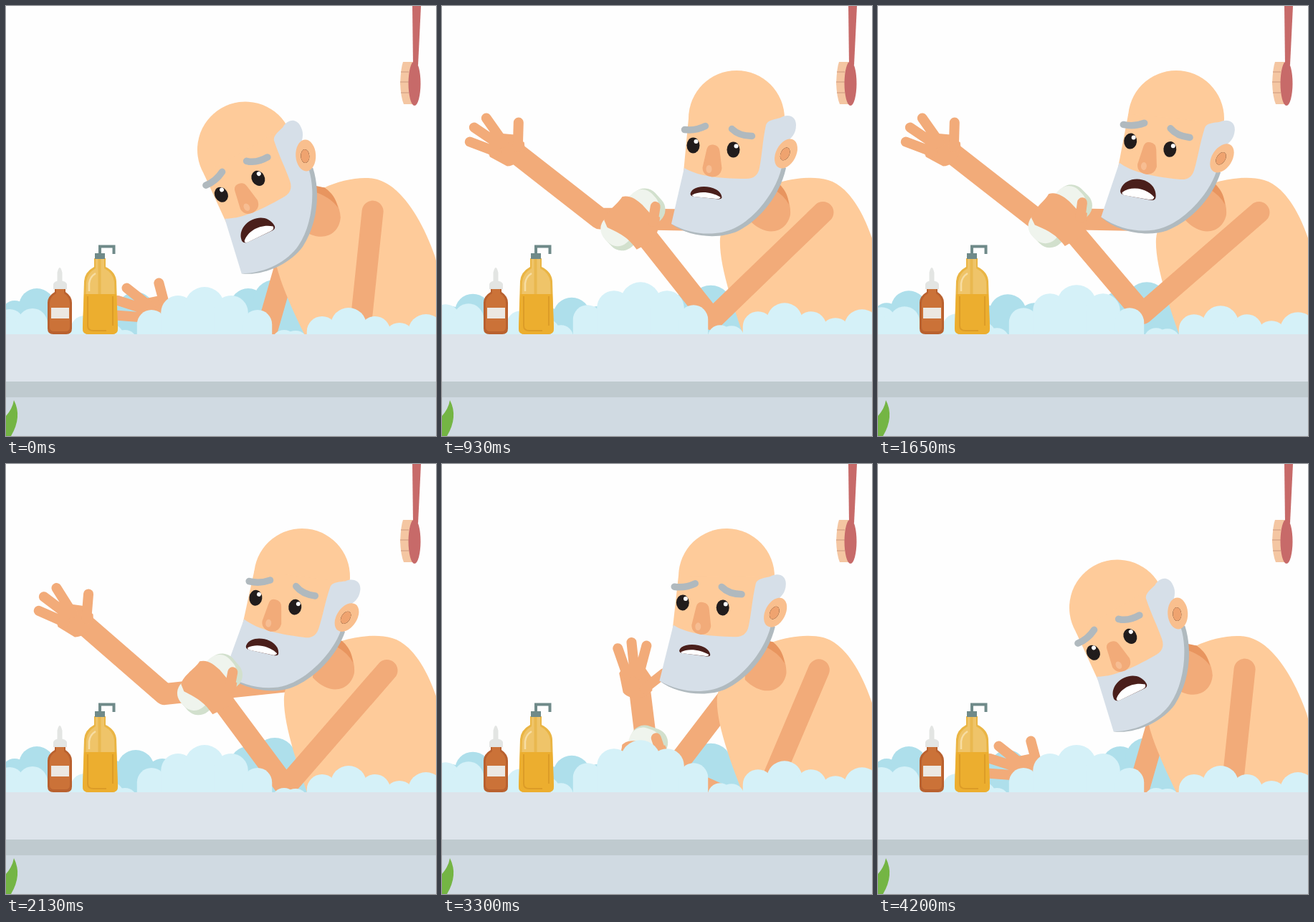
Animation of 600x600 px, one loop 4.23 s. Source, as an HTML page:

```html
<!DOCTYPE html>
<html lang="en">
<head>
<meta charset="utf-8">
<title>Bath time</title>
<style>
  html, body { margin: 0; width: 100%; height: 100%; overflow: hidden; background: #fefefe; }
  svg { display: block; width: 100vw; height: 100vh; }
  .skin { fill: #fecb9a; }
  .shade { fill: #f2ab79; }
  .limb { fill: none; stroke: #f2ab79; stroke-width: 30; stroke-linecap: round; stroke-linejoin: round; }
  .finger { stroke-width: 14; }
  .brow { fill: none; stroke: #b0b9be; stroke-width: 9.5; stroke-linecap: round; }
  .beard { fill: #d6dfe8; }
</style>
</head>
<body>
<svg viewBox="0 0 600 600">
  <rect width="600" height="600" fill="#fefefe"/>

  <g id="brush">
    <path d="M554 78H567V137H555Q551 128 550 108Q551 86 554 78Z" fill="#f4c6a2"/>
    <path d="M551 92H562M550 106H562M551 121H562" stroke="#d9a88b" stroke-width="1.5"/>
    <path d="M567 0H579L575 82H568Z" fill="#c76a69"/>
    <ellipse cx="570" cy="108" rx="8.5" ry="31" fill="#c76a69"/>
  </g>

  <g id="backFoam" fill="#aedfeb"></g>

  <g id="farArm">
    <polyline id="farLimb" class="limb"/>
    <g id="farHand">
      <path class="shade" d="M-28 4L-12 -18L10 -16L24 -5L25 6C20 20 10 28 0 28L-24 15Z"/>
      <path class="limb finger" d="M-15 8L-52 -6M-12 -3L-46 -26M-5 -5L-29 -39M15 2L16 -33"/>
    </g>
  </g>

  <g id="torso">
    <path class="skin" d="M468 247C490 240 519 237 539 243C573 253 598 305 610 360L625 480H428C408 425 386 362 388 325C391 290 430 255 468 247Z"/>
    <path class="shade" d="M430 238L469 247C481 260 487 276 486 291C481 316 453 325 428 298Z"/>
    <path d="M452 241L469 247C478 255 483 264 484 277Q476 261 452 250Z" fill="#e8955f"/>
  </g>

  <g id="head">
    <path d="M320 304C345 323 387 326 413 314C446 297 472 262 480 226L460 215Z" fill="#b0babf"/>
    <circle class="skin" cx="411" cy="157" r="67"/>
    <path class="skin" d="M344 157L337 232L440 250L472 200L478 157Z"/>
    <path class="beard" d="M338 226C355 236 380 241 425 241Q440 241 443 226C447 205 447 190 452 166C454 159 465 158 472 156C482 150 494 153 494 166C494 179 487 184 481 190L474 225C467 257 438 296 408 310C385 321 350 321 320 304Z"/>
    <g transform="rotate(27 480 206)">
      <ellipse cx="480" cy="206" rx="14" ry="22" fill="#f9bf8e"/>
      <ellipse cx="479" cy="207" rx="6" ry="9.5" fill="#ef a36f"/>
      <ellipse cx="479" cy="207" rx="6" ry="9.5" fill="#efa36f"/>
    </g>
    <g transform="translate(-.5 -1.5)">
      <g fill="#211c1c">
        <ellipse cx="351" cy="196" rx="9" ry="11"/>
        <ellipse cx="407" cy="202" rx="9" ry="11"/>
      </g>
      <g fill="#fff">
        <circle cx="355" cy="190.5" r="3"/>
        <circle cx="411" cy="197" r="3"/>
      </g>
      <path class="brow" d="M339 174Q354 176 368 169M405 173Q415 183 433 183"/>
      <path class="shade" d="M370 201Q372 194 379 195Q387 196 388 204L391 228Q389 240 377 240Q364 238 364 227Z"/>
      <ellipse cx="373" cy="229" rx="4" ry="5.5" fill="#f7bd92"/>
    </g>
    <g id="mouth">
      <path d="M-25 5C-22 -19 20 -23 25 4Q26 9 20 10L-18 12Q-26 12 -25 5Z" fill="#4a1f1b"/>
      <path d="M-22 9C-12 -3 8 -5 23 5Q23 10 16 10L-16 12Q-22 13 -22 9Z" fill="#fff"/>
    </g>
  </g>

  <g id="nearArm">
    <g id="soap">
      <g transform="rotate(-41)">
        <rect x="-47" y="-26" width="95" height="53" rx="20" fill="#d2e0cd"/>
        <rect x="-47" y="-27" width="91" height="45" rx="19" fill="#eff4ed"/>
      </g>
    </g>
    <polyline id="nearLimb" class="limb"/>
    <g id="nearHand">
      <path class="shade" d="M-40 0C-38 -12 -20 -22 -14 -32C-4 -35 6 -28 14 -20L24 -8L38 -2L36 12L29 30L4 42C-8 24 -20 18 -36 10Z"/>
      <path class="limb finger" d="M28 4L32 -17"/>
    </g>
  </g>

  <g id="bath">
    <g id="frontFoam" fill="#d5f1f8"></g>
    <rect y="458" width="600" height="67" fill="#dde4eb"/>
    <rect y="524" width="600" height="22" fill="#bfcacf"/>
    <rect y="546" width="600" height="54" fill="#d0dae2"/>
    <path d="M0 600V572Q9 562 11 550Q23 573 7 600Z" fill="#74b544"/>
  </g>

  <g id="dropper">
    <path d="M71.500 386V372Q75 358 78.500 372V386Z" fill="#e3e5e3"/>
    <path d="M66 395V388Q67 384 75 383Q84 384 85 388V395Z" fill="#e3e5e3"/>
    <path d="M68 395H83V399Q92 405 92 414V450Q92 458 84 458H66Q58 458 58 450V414Q58 405 68 399Z" fill="#b9612f"/>
    <path d="M70 395H81V401Q89 406 89 415V448Q89 454 83 454H67Q61 454 61 448V415Q61 406 70 401Z" fill="#cb7238"/>
    <rect x="63" y="421" width="25" height="15" fill="#ece8e2"/>
  </g>

  <g id="pump">
    <path d="M131 346V335.500H150.500V346" fill="none" stroke="#6f8a89" stroke-width="4"/>
    <path d="M123 352H139V364Q153 371 154 384L156 450Q156 458 148 458H115Q107 458 107 450L109 384Q110 371 123 364Z" fill="#eab544"/>
    <path d="M125 352H137V366Q150 373 151 385L153 449H110L112 385Q113 373 125 366Z" fill="#efc469"/>
    <rect x="128.500" y="352" width="4" height="50" fill="#e9b84f"/>
    <rect x="124" y="345" width="14" height="8" fill="#6f8a89"/>
    <path d="M109 402H154L156 450Q156 458 148 458H115Q107 458 107 450Z" fill="#ecae2f"/>
    <path d="M114 405V446Q114 453 122 453H140M149 405V446" fill="none" stroke="#dc9c27" stroke-width="2"/>
    <path d="M116 398V387Q117 378 125 373" fill="none" stroke="#f7dda3" stroke-width="2.500"/>
  </g>
</svg>
<script>
const LOOP = 4230, STEP = 30, PIVOT = [510, 450];
const $ = id => document.getElementById(id);

// Angles in degrees; each pose starts from the one it resembles.
const rest = { x: 334, tilt: -30, lean: -7, farUpper: 106, farFore: 210.5, wrist: -9, nearUpper: 96, nearFore: 180, mouth: 1 };
const reach = { x: 411, tilt: 0, lean: 0, farUpper: 181, farFore: 218, wrist: 0, nearUpper: 136, nearFore: 231.6, mouth: .6 };
const stretch = { ...reach, x: 416, tilt: 5.5, nearUpper: 139, nearFore: 229.7, mouth: 1 };
const bend = { ...stretch, x: 413, tilt: 7, farUpper: 174, farFore: 221, nearUpper: 131, nearFore: 233.4, mouth: .75 };
const tuck = { ...bend, x: 390, tilt: 0, lean: -4, farUpper: 136.6, farFore: 291, nearUpper: 116, mouth: .55 };
const wave = { ...tuck, x: 397, tilt: 1, lean: -2, farUpper: 127.4, farFore: 263, wrist: 5, nearUpper: 113, nearFore: 204 };

const keys = [[0, rest], [530, reach], [930, reach], [1650, stretch], [2130, bend],
  [2760, tuck], [3300, wave], [3540, wave], [4170, rest], [LOOP, rest]];

// A clump is a tall puff with smaller, lower ones stepping away on both sides.
function clump(id, x, top, r, spread) {
  for (let i = -spread; i <= spread; i++) {
    const k = Math.abs(i), size = r * .85 ** k;
    const y = top + 8 * k + 4 * k * k;
    $(id).insertAdjacentHTML("beforeend",
      `<rect x="${x + 37 * i - size}" y="${y}" width="${2 * size}" height="110" rx="${size}"/>`);
  }
}
clump("backFoam", 12, 411, 18, 0);
clump("backFoam", 43, 394, 25, 0);
clump("backFoam", 181, 399, 26, 1);
clump("backFoam", 375, 382, 30, 1);
clump("frontFoam", 5, 423, 20, 0);
clump("frontFoam", 37, 422, 21, 1);
clump("frontFoam", 110, 432, 20, 1);
clump("frontFoam", 277, 392, 28, 3);
clump("frontFoam", 478, 421, 25, 2);
clump("frontFoam", 586, 430, 25, 1);

const rad = deg => deg * Math.PI / 180;
const along = ([x, y], deg, len) => [x + len * Math.cos(rad(deg)), y + len * Math.sin(rad(deg))];
const place = (id, value) => $(id).setAttribute("transform", value);

function onTorso([x, y], deg) {
  const dx = x - PIVOT[0], dy = y - PIVOT[1], c = Math.cos(rad(deg)), s = Math.sin(rad(deg));
  return [PIVOT[0] + dx * c - dy * s, PIVOT[1] + dx * s + dy * c];
}

function poseAt(t) {
  const i = keys.findIndex(([end]) => t < end);
  const [t0, a] = keys[i - 1], [t1, b] = keys[i];
  const u = (t - t0) / (t1 - t0), ease = u * u * (3 - 2 * u);
  const pose = {};
  for (const k in a) pose[k] = a[k] + (b[k] - a[k]) * ease;
  return pose;
}

function drawArm(id, shoulder, upper, fore, upperLen, foreLen) {
  const elbow = along(shoulder, upper, upperLen);
  const hand = along(elbow, fore, foreLen);
  $(id).setAttribute("points", [shoulder, elbow, hand].join(" "));
  return hand;
}

function draw(t) {
  const p = poseAt(t);
  const headY = 157 + 1.45 * Math.max(0, -p.tilt); // the head sinks as it tips forward
  place("torso", `rotate(${p.lean} ${PIVOT})`);
  place("head", `translate(${p.x} ${headY}) rotate(${p.tilt}) translate(-411 -157)`);
  place("mouth", `translate(369 261) rotate(8) scale(${.7 + .3 * p.mouth} ${p.mouth})`);

  const far = drawArm("farLimb", onTorso([422, 300], p.lean), p.farUpper, p.farFore, 202, 164);
  place("farHand", `translate(${far}) rotate(${p.farFore - 218 + p.wrist})`);

  const near = drawArm("nearLimb", onTorso([531.5, 288], p.lean), p.nearUpper, p.nearFore, 215, 178);
  const grip = `translate(${near}) rotate(${p.nearFore - 233.4})`;
  place("nearHand", grip);
  place("soap", grip);

  const swell = 1 - Math.cos(4 * Math.PI * t / LOOP);
  place("backFoam", `translate(0 ${4 * swell})`);
  place("frontFoam", `translate(0 ${-3.5 * swell})`);
}

const start = performance.now();
function tick() {
  const t = (performance.now() - start) % LOOP;
  draw(Math.floor(t / STEP) * STEP);
  requestAnimationFrame(tick);
}
tick();
</script>
</body>
</html>
```
